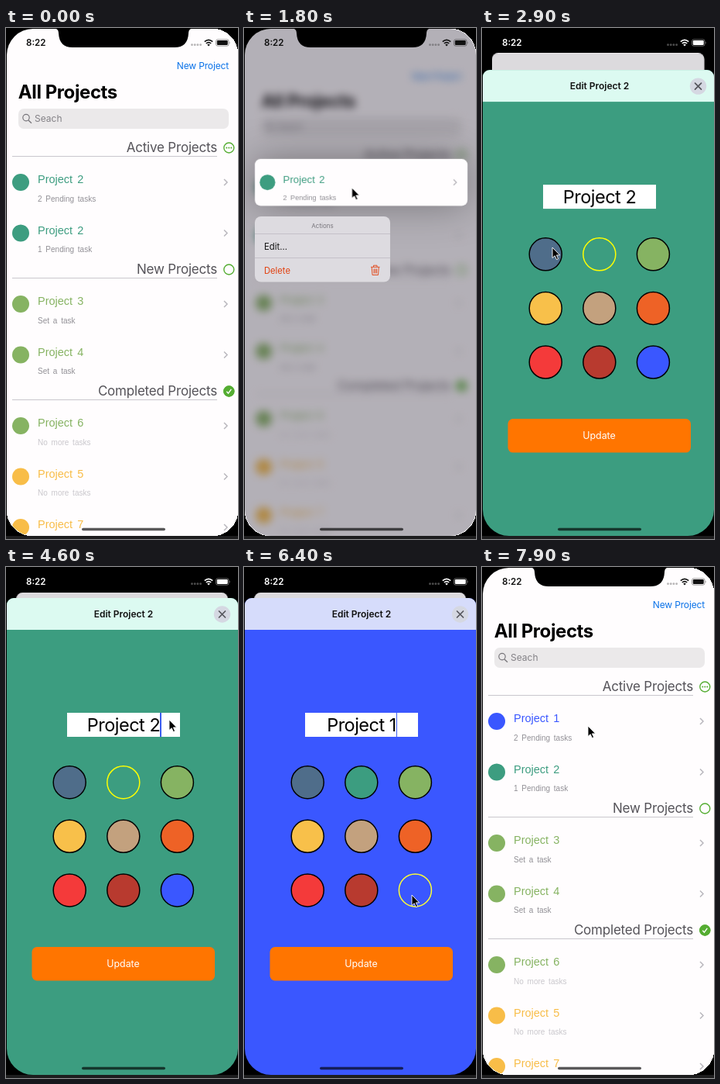
Recreate the animation shown at these times as an HTML page. Size 300 by 659 pixels, loop 8 s.

```html
<!DOCTYPE html>
<html lang="en">
<head>
<meta charset="utf-8">
<title>Projects</title>
<style>
:root { --spring: cubic-bezier(.2, .65, .15, 1); }
html, body { margin: 0; width: 100%; height: 100%; overflow: hidden; background: #000; }
body { position: relative; font-family: Inter, sans-serif; }
body::after { content: ""; position: absolute; left: 0; top: 655px; width: 300px; height: 4px; background: #1d1d1e; }
svg { position: absolute; left: 0; top: 0; width: 300px; height: 659px; overflow: visible; }
#screen, #card, #dim { position: absolute; left: 0; top: 0; width: 300px; height: 659px; }
#screen { background: #000; clip-path: inset(1px 0 4px 1px round 34px); }
#card { background: #fffdfe; overflow: hidden; transform-origin: 151.5px 0; }
#dim { background: #322d3c; opacity: 0; }
#content { transform-origin: 150px 329px; }
#lift { transform-origin: 151.5px 199px; opacity: 0; }
#menu { transform-origin: 20px 243px; opacity: 0; }
.row { font-family: "Liberation Sans", Arial, sans-serif; word-spacing: 2px; }
.row .title { font-size: 14.5px; }
.row .note { font-size: 10px; }
.head { font-size: 17px; letter-spacing: -.2px; fill: #555359; text-anchor: end; }

#sheet { position: absolute; left: 1px; top: 40px; width: 299px; height: 619px; border-radius: 9px 9px 0 0; overflow: hidden; background: #3c9d80; transform: translateY(616px); }
#sheet svg { left: -1px; top: -40px; }
#field { position: absolute; left: 78px; top: 148px; width: 146px; height: 31px; background: #fff; }
#field p { position: absolute; inset: 0; margin: 0; font-size: 23.5px; line-height: 31px; letter-spacing: -.5px; text-align: center; white-space: pre; }
#field i { position: relative; }
#field i::after { content: ""; position: absolute; left: 0; top: -1px; width: 1.5px; height: 31px; background: #3a5cf0; animation: blink 8s step-end infinite; }
.swatch { stroke: #000; stroke-width: 1.5; }

#card, #content, #dim, #lift, #lift rect, #menu, #sheet, #status, #cursor { animation: 8s linear infinite; }
#card { animation-name: recede; animation-timing-function: var(--spring); }
#content { animation-name: blur; animation-timing-function: ease-out; }
#dim { animation-name: dim; animation-timing-function: ease-out; }
#lift { animation-name: lift; animation-timing-function: ease-out; }
#lift rect { animation-name: round; animation-timing-function: ease-out; }
#menu { animation-name: menu; animation-timing-function: ease-out; }
#sheet { animation: slide 8s var(--spring) infinite, tint 8s step-end infinite; }
#status { animation-name: invert; }
#cursor { animation-name: point; animation-timing-function: ease-in-out; }
#bar { animation: bar 8s step-end infinite; }
.from { animation: deselect 8s step-end infinite; }
.to { animation: select 8s step-end infinite; }
.before { animation: before 8s step-end infinite; }
.after { animation: after 8s step-end infinite; }
.t1 { animation: t1 8s step-end infinite; }
.t2 { animation: t2 8s step-end infinite; }
.t3 { animation: t3 8s step-end infinite; }

@keyframes recede {
  0%, 32.4% { transform: translateY(0) scale(1); border-radius: 0; }
  38.1%, 86.9% { transform: translateY(33px) scale(.913); border-radius: 9px; }
  93.1%, 100% { transform: translateY(0) scale(1); border-radius: 0; }
}
@keyframes blur {
  0%, 20% { transform: scale(1); filter: blur(0); }
  22.5%, 27.5% { transform: scale(.95); filter: blur(5.5px); }
  31.9%, 100% { transform: scale(1); filter: blur(0); }
}
@keyframes dim {
  0%, 20%, 31.9%, 32.4% { opacity: 0; }
  22.5%, 27.5% { opacity: .37; }
  36%, 86.9% { opacity: .17; }
  93.1%, 100% { opacity: 0; }
}
@keyframes lift {
  0%, 14.99% { opacity: 0; transform: scale(1); filter: drop-shadow(0 0 0 #0000); }
  15% { opacity: 1; transform: scale(1); filter: drop-shadow(0 0 0 #0000); }
  19.5%, 20% { opacity: 1; transform: scale(1.025); filter: drop-shadow(0 1px 6px #0008); }
  22.5%, 27.5% { opacity: 1; transform: scale(.915); filter: drop-shadow(0 0 28px #0005); }
  31.9% { opacity: 1; transform: scale(1); filter: drop-shadow(0 0 0 #0000); }
  31.91%, 100% { opacity: 0; transform: scale(1); filter: drop-shadow(0 0 0 #0000); }
}
@keyframes round {
  0%, 20%, 31.9%, 100% { rx: 0px; }
  22.5%, 27.5% { rx: 8px; }
}
@keyframes menu {
  0%, 20% { opacity: 0; transform: scale(.5); }
  22.5%, 27.5% { opacity: 1; transform: scale(1); }
  30.5%, 100% { opacity: 0; transform: scale(.5); }
}
@keyframes slide {
  0%, 32.4% { transform: translateY(616px); }
  38.1%, 86.9% { transform: translateY(0); }
  93.1%, 100% { transform: translateY(616px); }
}
@keyframes tint { 0% { background: #3c9d80; } 79.9%, 100% { background: #3a57ff; } }
@keyframes bar { 0% { fill: #dcfaf1; } 79.9%, 100% { fill: #d6dcfb; } }
@keyframes deselect { 0% { stroke: #ff0; } 79.9%, 100% { stroke: #000; } }
@keyframes select { 0% { stroke: #000; } 79.9%, 100% { stroke: #ff3; } }
@keyframes invert { 0%, 32.4% { color: #111; } 35%, 86.9% { color: #fff; } 90%, 100% { color: #111; } }
@keyframes before { 0% { opacity: 1; } 86.8%, 100% { opacity: 0; } }
@keyframes after { 0% { opacity: 0; } 86.8%, 100% { opacity: 1; } }
@keyframes t1 { 0% { opacity: 1; } 62.5%, 100% { opacity: 0; } }
@keyframes t2 { 0% { opacity: 0; } 62.5% { opacity: 1; } 66.5%, 100% { opacity: 0; } }
@keyframes t3 { 0% { opacity: 0; } 66.5%, 100% { opacity: 1; } }
@keyframes blink { 0%, 60%, 72.5%, 86.8%, 100% { opacity: 0; } 54%, 62%, 78% { opacity: 1; } }
@keyframes point {
  0%, 3% { opacity: 0; transform: translate(296px, 420px); }
  3.01% { opacity: 1; transform: translate(296px, 420px); }
  11%, 23% { transform: translate(139.5px, 206px); }
  26.5%, 40% { transform: translate(91px, 283px); }
  51%, 69% { transform: translate(211px, 197px); }
  77.5%, 80.5% { transform: translate(217px, 423px); }
  85.2%, 87.5% { transform: translate(185px, 508px); }
  97%, 100% { opacity: 1; transform: translate(137px, 205px); }
}
</style>
</head>
<body>
<div id="screen">
  <div id="card">
    <svg id="content" viewBox="0 0 300 659"></svg>
    <div id="dim"></div>
  </div>

  <svg viewBox="0 0 300 659">
    <g id="lift"></g>
    <g id="menu">
      <rect x="14" y="243" width="175" height="84.5" rx="8" fill="#dddbe0"/>
      <path d="M14 265.5H189M14 296.5H189" stroke="#bebcc2" stroke-width=".8"/>
      <text x="101.5" y="258" font-size="8" fill="#77757b" text-anchor="middle">Actions</text>
      <text x="26" y="286" font-size="11.3" fill="#151515">Edit...</text>
      <text x="26" y="317" font-size="11.2" fill="#e2400f">Delete</text>
      <path d="M164 308.3H175.5M167.5 308V306.2H172V308M165.2 308.5L166 318.5H173.5L174.3 308.5M168 310.5V316.5M169.8 310.5V316.5M171.6 310.5V316.5" fill="none" stroke="#e2400f" stroke-width=".9"/>
    </g>
  </svg>

  <div id="sheet">
    <svg id="form" viewBox="0 0 300 659">
      <rect id="bar" x="0" y="40" width="300" height="41"/>
      <text x="152" y="65.3" font-size="12" font-weight="600" fill="#111" text-anchor="middle">Edit Project 2</text>
      <circle cx="279.5" cy="61" r="10.7" fill="#d5d8e2"/>
      <path d="M275.5 57L283.5 65M283.5 57L275.5 65" stroke="#55565c" stroke-width="1.7" stroke-linecap="round"/>
      <g id="swatches"></g>
      <rect x="33.5" y="490" width="236.5" height="43.5" rx="6.5" fill="#ff7500"/>
      <text x="151.5" y="516.3" font-size="12.4" fill="#fff" text-anchor="middle">Update</text>
    </svg>
    <div id="field">
      <p class="t1">Project 2<i></i></p>
      <p class="t2">Project <i></i></p>
      <p class="t3">Project 1<i></i></p>
    </div>
  </div>

  <svg viewBox="0 0 300 659">
    <path d="M62 0Q68 1 68 7Q69 25 86 25H218Q235 25 236 7Q236 1 242 0Z"/>
    <g id="status" fill="currentColor">
      <text x="26" y="23.2" font-size="11.6" font-weight="600">8:22</text>
      <g opacity=".3">
        <circle cx="240.5" cy="21.7" r="1.4"/><circle cx="244.2" cy="21.7" r="1.4"/>
        <circle cx="247.9" cy="21.7" r="1.4"/><circle cx="251.6" cy="21.7" r="1.4"/>
      </g>
      <path d="M256.8 17.6Q262 13 267.2 17.6M258.8 19.9Q262 17.2 265.2 19.9" fill="none" stroke="currentColor" stroke-width="1.6"/>
      <path d="M260.2 21.5Q262 20 263.8 21.5L262 23.5Z"/>
      <rect x="271.5" y="14.8" width="16.5" height="8.4" rx="2.3" fill="none" stroke="currentColor" stroke-width=".8" opacity=".5"/>
      <rect x="272.8" y="16.1" width="13.9" height="5.8" rx="1.2"/>
      <path d="M288.9 17.5Q290.4 19 288.9 20.5Z" opacity=".5"/>
    </g>
    <rect x="98" y="644.7" width="108" height="3.6" rx="1.8" opacity=".65"/>
  </svg>
</div>

<svg viewBox="0 0 300 659">
  <path id="cursor" d="M0 0V13.5L3.2 10.7L5.4 15.6L7.6 14.6L5.4 9.9H9.7Z" stroke="#fff" stroke-width=".9"/>
</svg>

<script>
const teal = '#3d9d80', green = '#86b362', amber = '#f8bd48', blue = '#3a57ff', mark = '#55ad32';
const byId = id => document.getElementById(id);

const row = (y, name, note, color, cls = '') => `
  <g class="row ${cls}">
    <circle cx="19" cy="${y}" r="11" fill="${color}"/>
    <text class="title" x="41" y="${y + 1}" fill="${color}">${name}</text>
    <text class="note" x="41" y="${y + 24.5}" fill="${note === 'No more tasks' ? '#c9c7cc' : '#929096'}">${note}</text>
    <path d="M282 ${y - 4}L286 ${y}L282 ${y + 4}" fill="none" stroke="#b9b7bd" stroke-width="1.5"/>
  </g>`;

const section = (y, name, icon) => `
  <text class="head" x="273" y="${y + 6}">${name}</text>
  <path d="M8 ${y + 11.5}H273" stroke="#c9c7cd"/>
  <g transform="translate(288.3 ${y + .5})" fill="none" stroke="${mark}" stroke-width="1.4">
    <circle r="6.5"/>${icon}
  </g>`;

const dots = [-3, 0, 3].map(x => `<circle cx="${x}" r="1" fill="${mark}" stroke="none"/>`).join('');
const check = `<circle r="6.5" fill="${mark}"/><path d="M-3 .3L-.9 2.6L3 -2.6" stroke="#fff"/>`;

byId('content').innerHTML = `
  <text x="288" y="53" font-size="12" letter-spacing="-.15" fill="#0a72e8" text-anchor="end">New Project</text>
  <text x="15.8" y="91" font-size="24" font-weight="700" letter-spacing="-.42">All Projects</text>
  <rect x="16" y="104" width="272" height="26" rx="7" fill="#ebe9ea"/>
  <path d="M29 119L33 122.8" stroke="#77757a" stroke-width="1.3"/>
  <circle cx="26" cy="115.6" r="4.2" fill="none" stroke="#77757a" stroke-width="1.2"/>
  <text x="37" y="121" font-size="12" fill="#838186">Seach</text>` +
  section(154, 'Active Projects', dots) +
  row(199, 'Project 2', '2 Pending tasks', teal, 'before') +
  row(199, 'Project 1', '2 Pending tasks', blue, 'after') +
  row(264.5, 'Project 2', '1 Pending task', teal) +
  section(311, 'New Projects', '') +
  row(356, 'Project 3', 'Set a task', green) +
  row(421.5, 'Project 4', 'Set a task', green) +
  section(468, 'Completed Projects', check) +
  row(513, 'Project 6', 'No more tasks', green) +
  row(578.5, 'Project 5', 'No more tasks', amber) +
  row(644, 'Project 7', 'No more tasks', amber);

byId('lift').innerHTML = '<rect x="1.2" y="166" width="300.5" height="66" fill="#fffdfe"/>' +
  row(199, 'Project 2', '2 Pending tasks', teal);

const colors = ['#4f6d8a', '#3c9d80', green, '#f8c04a', '#c3a17e', '#ee6226', '#f43a3a', '#b83a2f', blue];
byId('swatches').innerHTML = colors.map((c, i) => {
  const cls = i === 1 ? 'from' : i === 8 ? 'to' : '';
  return `<circle class="swatch ${cls}" cx="${82.2 + i % 3 * 69.6}" cy="${277.7 + Math.floor(i / 3) * 69.6}" r="21" fill="${c}"/>`;
}).join('');
</script>
</body>
</html>
```
